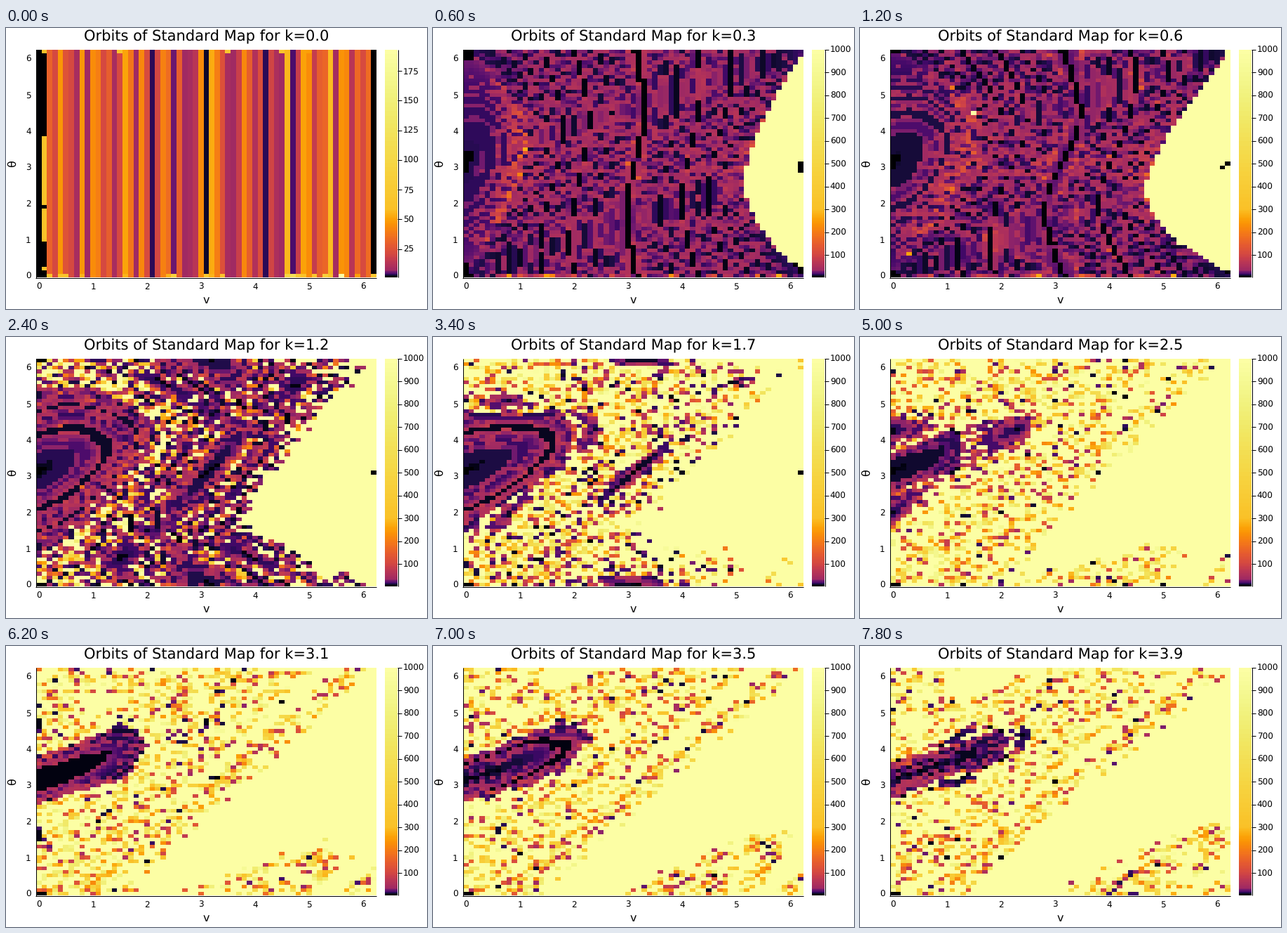
A matplotlib script that plays this animation: 600 px wide and 400 px high, repeating every 8000 ms.

```python
import numpy as np
import matplotlib.pyplot as plt
from matplotlib.animation import FuncAnimation

W, H = 600, 400
FRAMES, INTERVAL = 40, 200
LEFT, RIGHT, TOP, BOTTOM = 43.4, 527.7, 30.6, 355.3
BAR_L, BAR_R = 540, 558
TAU = 2 * np.pi
CELLS, TOL, MAX_STEPS = 63, 0.1, 1000
# evenly spaced inferno colours are pinned to these fractions of the range
STOPS = [0, 0.01, 0.02, 0.03, 0.1, 0.2, 0.3, 1]


def wrap(x):
    """Remainder that keeps the sign of x, for |x| < 4 pi."""
    return x - TAU * np.trunc(x / TAU)


def return_times(k):
    """Steps until each start (row theta, column v) comes back within TOL."""
    grid = np.arange(CELLS) * 0.1
    v0, th0 = (a.ravel() for a in np.meshgrid(grid, grid))
    v, th = v0.copy(), th0.copy()
    cell = np.arange(v0.size)
    times = np.full(v0.size, MAX_STEPS)
    for n in range(1, MAX_STEPS):
        v = wrap(v + k * np.sin(th))
        th = wrap(th + v)
        hit = (np.abs(v - v0) <= TOL) & (np.abs(th - th0) <= TOL)
        back = cell[hit]
        times[back] = np.minimum(times[back], n)
        if n < 10 or n % 20 == 0:
            on = times[cell] == MAX_STEPS
            v, th, v0, th0, cell = (a[on] for a in (v, th, v0, th0, cell))
    return times.reshape(CELLS, CELLS)


def shade(x):
    c = np.interp(x, STOPS, np.linspace(0, 1, len(STOPS)))
    return plt.cm.inferno(c)[..., :3]


maps = [return_times(i / 10) for i in range(FRAMES)]

plt.rcParams["font.family"] = "DejaVu Sans"
plt.rcParams["text.hinting"] = "none"
plt.rcParams["text.hinting_factor"] = 1
fig = plt.figure(figsize=(W / 100, H / 100), dpi=100, facecolor="white")
ax = fig.add_axes([0, 0, 1, 1])
ax.axis("off")


def text(x, y, s, px, **kw):
    return ax.text(x, y, s, fontsize=px * 0.72, color="black", **kw)


def line(xs, ys):
    return ax.plot(xs, ys, color="black", lw=0.72, solid_capstyle="butt",
                   zorder=3)[0]


def picture(rgb, x0, x1):
    """Image on whole pixels; the tiny inset keeps sizes from rounding up."""
    e = 0.01
    return ax.imshow(rgb, extent=(x0 + e, x1 - e, 355 - e, 31 + e),
                     origin="lower", aspect="auto", interpolation="nearest")


heat = picture(np.zeros((CELLS, CELLS, 3)), 43, 528)
picture(shade(np.linspace(0, 1, 256))[:, None], BAR_L, BAR_R)
ax.set_xlim(0, W)
ax.set_ylim(H, 0)

line([42.5, 42.5], [31, 356])
line([42, 528], [355.5, 355.5])
line([BAR_R + 0.5, BAR_R + 0.5], [31, 355])

mid = (LEFT + RIGHT) / 2
title = text(286, 18.3, "", 20.8, ha="center", va="baseline")
text(mid, 391.7, "v", 16.3, ha="center", va="baseline")
text(10, 193, "θ", 16.3, ha="center", va="center", rotation=90)
for n in range(7):
    x = LEFT + (n * 10 + 0.5) * (RIGHT - LEFT) / CELLS
    y = BOTTOM - (n * 10 + 0.5) * (BOTTOM - TOP) / CELLS
    text(x, 371.5, str(n), 11.9, ha="center", va="baseline")
    text(35.8, y + 4.4, str(n), 11.9, ha="right", va="baseline")

ticks = [(line([BAR_R, BAR_R + 6], [0, 0]),
          text(565.8, 0, "", 11.9, va="baseline")) for _ in range(10)]


def draw(i):
    times = maps[i]
    low, high = times.min(), times.max()
    heat.set_data(shade((times - low) / (high - low)))
    title.set_text(f"Orbits of Standard Map for k={i / 10:.1f}")
    step = 25 if high < 250 else 100
    for n, (mark, label) in enumerate(ticks, 1):
        value = n * step
        y = BOTTOM - (value - low) / (high - low) * (BOTTOM - TOP)
        mark.set_ydata([y, y])
        label.set_y(y + 4.4)
        label.set_text(str(value))
        for part in (mark, label):
            part.set_visible(value <= high)
    return []


anim = FuncAnimation(fig, draw, frames=FRAMES, interval=INTERVAL,
                     repeat=True, repeat_delay=0, blit=False)
plt.show()
```
